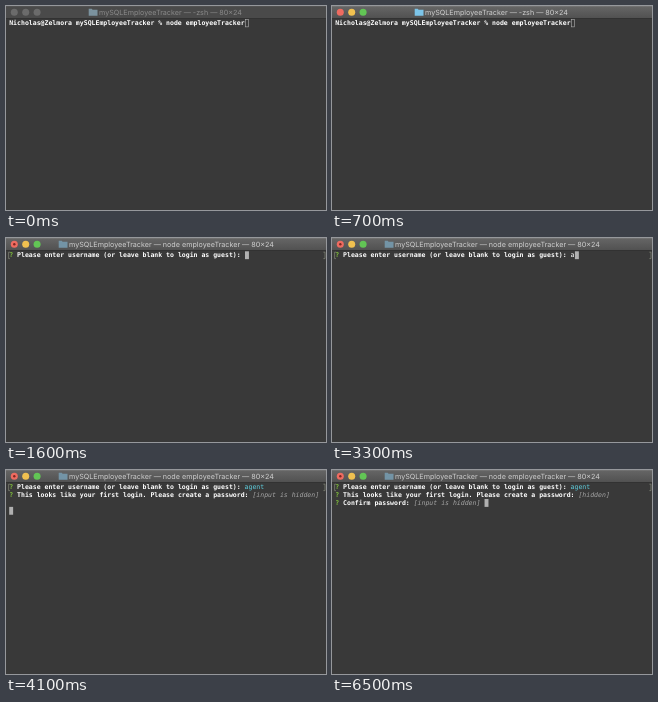
An HTML page for the animation above (8 s loop, 320 by 204 pixels).

```html
<!DOCTYPE html>
<html lang="en">
<head>
<meta charset="utf-8">
<title>Terminal login</title>
<style>
  html, body { margin: 0; width: 100%; height: 100%; overflow: hidden; background: #393939; }
  svg { display: block; width: 100vw; height: 100vh; }
  text { white-space: pre; text-rendering: geometricPrecision; }
  #title { font: 7.18px Inter, "Open Sans", sans-serif; fill: #cfcfcf; }
  #rows { font: 6.53px "DejaVu Sans Mono", "Liberation Mono", monospace; fill: #fff; }
  .bold { font-weight: bold; }
  .mark { font-weight: bold; fill: #83c43c; }
  .answer { fill: #5fd0e0; }
  .dim { font-style: italic; fill: #a6a6a6; }
  #folder { fill: #7cc4e8; }
  .running #folder { fill: #7394a6; }
  #dot { fill: #7d2622; visibility: hidden; }
  .running #dot { visibility: visible; }
  .idle #bar { fill: #4a4a4a; }
  .idle #shine { stroke: #5c5c5c; }
  .idle #title { fill: #8a8a8a; }
  .idle #lights circle { fill: #6b6b6b; }
  .idle #folder { fill: #7b929e; }
</style>
</head>
<body>
<svg id="stage" viewBox="0 0 320 204" preserveAspectRatio="none">
  <defs>
    <linearGradient id="metal" x2="0" y2="1">
      <stop stop-color="#666"/>
      <stop offset="1" stop-color="#515151"/>
    </linearGradient>
  </defs>
  <rect width="320" height="204" fill="#393939"/>
  <rect id="bar" width="320" height="12.2" fill="url(#metal)"/>
  <path id="shine" d="M0 .3H320" stroke="#7c7c7c" stroke-width=".6"/>
  <path d="M0 12.5H320" stroke="#2b2b2b" stroke-width=".6"/>
  <g id="lights">
    <circle cx="8.3" cy="6.2" r="3.5" fill="#ee6b60"/>
    <circle cx="19.7" cy="6.2" r="3.5" fill="#f0c050"/>
    <circle cx="31.1" cy="6.2" r="3.5" fill="#62c555"/>
  </g>
  <circle id="dot" cx="8.3" cy="6.2" r="1.2"/>
  <path id="folder" d="M0 2.7h3l.9 1h4.9v6.1h-8.8z"/>
  <text id="title" y="8.8"></text>
  <path id="brackets" d="M4 14.2H2.6V20.6H4M317.4 14.2H319V20.6H317.4" fill="none" stroke="#8f9484" stroke-width=".6"/>
  <rect id="cursor"/>
  <g id="rows"></g>
</svg>
<script>
const LOOP = 8000, LEFT = 3.2, TOP = 13.3, COL = 3.93, ROW = 7.86;
const $ = id => document.getElementById(id);
const span = (style, s) => `<tspan class="${style}">${s}</tspan>`;
const ask = s => span('mark', '? ') + span('bold', s + ' ');

const command = span('bold', 'Nicholas@Zelmora mySQLEmployeeTracker % node employeeTracker');
const user = ask('Please enter username (or leave blank to login as guest):');
const create = ask('This looks like your first login. Please create a password:');
const confirm = ask('Confirm password:');
const named = user + span('answer', 'agent');
const masked = span('dim', '[input is hidden]');
const hidden = span('dim', '[hidden]');
const keyTimes = [3300, 3500, 3600, 3700, 3800];

// Returns the text rows and the cursor cell.
function screen(t) {
  if (t < 1200) return [[command], 60, 0];
  if (t < 1600) return [[command], 0, 1];
  if (t < 4100) {
    const n = keyTimes.filter(k => t >= k).length;
    return [[user + 'agent'.slice(0, n)], 60 + n, 0];
  }
  if (t < 6400) return [[named, create + masked], 0, 3];
  if (t < 6500) return [[named, create + hidden], 0, 2];
  return [[named, create + hidden, confirm + masked], 38, 2];
}

function set(el, attrs) {
  for (const k in attrs) el.setAttribute(k, attrs[k]);
}

let shown = '';
function draw(t) {
  const [rows, col, row] = screen(t);
  const running = t >= 1300;
  const markup = rows.map((s, i) =>
    `<text x="${LEFT}" y="${TOP + 6 + i * ROW}">${s}</text>`).join('');
  if (markup !== shown) $('rows').innerHTML = shown = markup;

  set($('stage'), { class: t < 700 ? 'idle' : running ? 'running' : '' });
  const x = running ? 63 : 93;
  $('title').textContent = `mySQLEmployeeTracker — ${running ? 'node employeeTracker' : '-zsh'} — 80×24`;
  set($('title'), { x });
  set($('folder'), { transform: `translate(${x - 10.3} 0)` });
  set($('brackets'), { visibility: t < 1200 ? 'hidden' : 'visible' });

  const hollow = t < 800, inset = hollow ? .3 : 0;
  set($('cursor'), {
    x: LEFT + col * COL + inset, y: TOP + row * ROW + inset,
    width: COL - 2 * inset, height: ROW - 2 * inset,
    fill: hollow ? 'none' : '#b0b0b0',
    stroke: hollow ? '#b0b0b0' : 'none', 'stroke-width': .6
  });
}

const start = performance.now();
function tick() {
  draw((performance.now() - start) % LOOP);
  requestAnimationFrame(tick);
}
tick();
</script>
</body>
</html>
```
